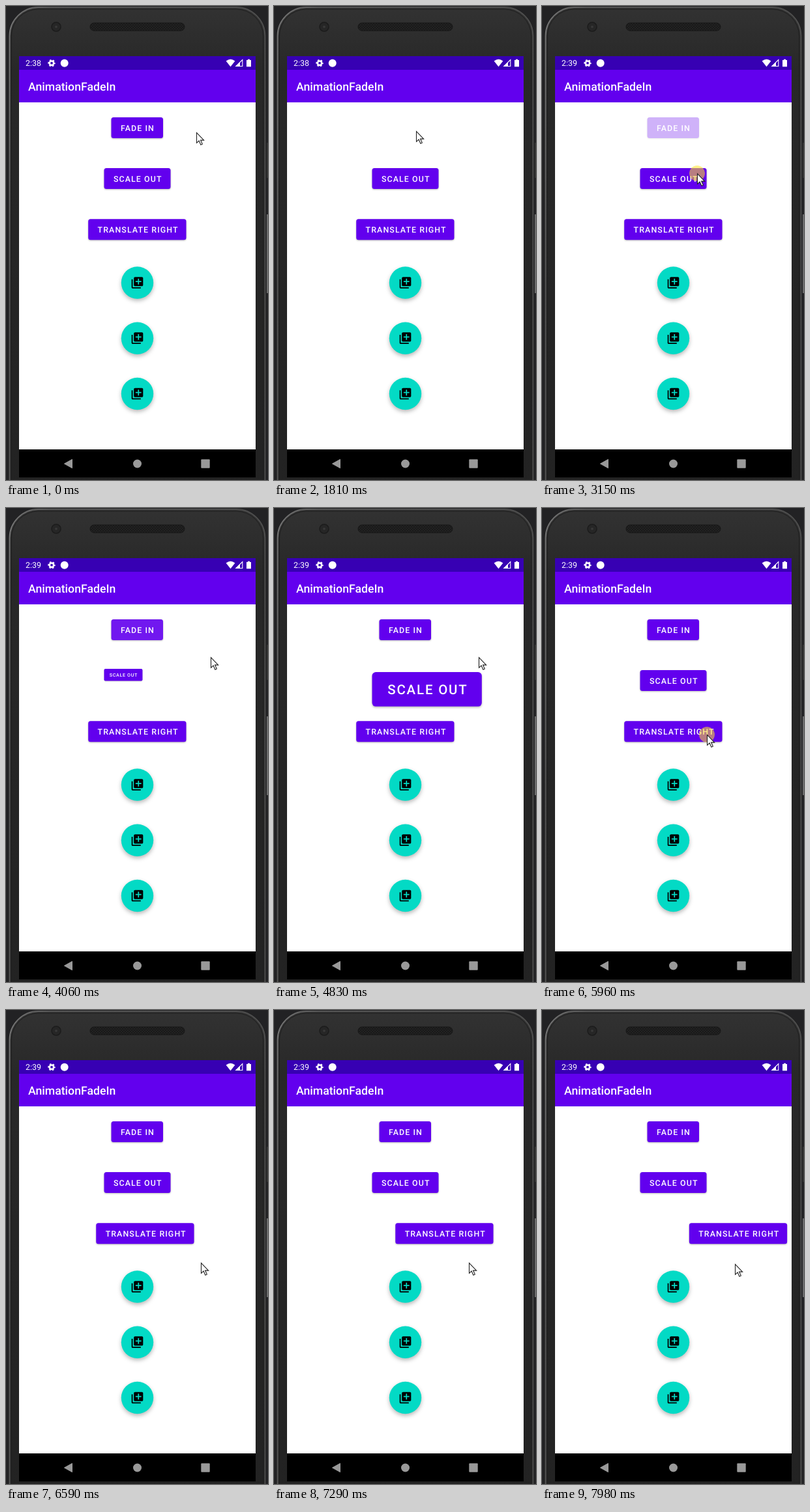
Write an HTML page that moves like this. It is 402 px wide and 728 px high and loops after 8 s.

```html
<!DOCTYPE html>
<html lang="en">
<head>
<meta charset="utf-8">
<title>Button animations</title>
<style>
  html, body { margin: 0; width: 100%; height: 100%; overflow: hidden; background: #222224; }
  svg { display: block; width: 402px; height: 728px; }
  text { font-family: Roboto, Arial, sans-serif; fill: #fff; text-rendering: geometricPrecision; }
  .label { font-size: 12.4px; font-weight: 500; letter-spacing: 1.1px; }
  .button rect { fill: #6200ee; filter: drop-shadow(0 1px 1px rgba(0, 0, 0, .28)); }
  .fab circle { fill: #03dac5; filter: drop-shadow(0 3px 3px rgba(0, 0, 0, .28)); }
</style>
</head>
<body>
<svg viewBox="0 0 402 728">
  <defs>
    <linearGradient id="shell" x2="0" y2="1">
      <stop offset="0" stop-color="#323232"/>
      <stop offset=".12" stop-color="#282828"/>
      <stop offset="1" stop-color="#222"/>
    </linearGradient>
    <linearGradient id="rim" x2="1" y2=".3">
      <stop offset="0" stop-color="#777"/>
      <stop offset=".15" stop-color="#555"/>
      <stop offset="1" stop-color="#4c4c4c"/>
    </linearGradient>
    <pattern id="mesh" width="4" height="4" patternUnits="userSpaceOnUse">
      <rect width="4" height="4" fill="#191919"/>
      <circle cx="1" cy="1" r=".8" fill="#2c2c2c"/>
      <circle cx="3" cy="3" r=".8" fill="#2c2c2c"/>
    </pattern>
    <path id="add" d="M4 6H2v14c0 1.1.9 2 2 2h14v-2H4V6zm16-4H8c-1.1 0-2 .9-2 2v12c0 1.1.9 2 2 2h12c1.1 0 2-.9 2-2V4c0-1.1-.9-2-2-2zm-1 9h-4v4h-2v-4H9V9h4V5h2v4h4v2z"/>
  </defs>

  <!-- phone -->
  <rect width="402" height="728" fill="#222224"/>
  <rect x="400" y="210" width="2" height="54" fill="#333"/>
  <rect x="400" y="320" width="2" height="121" fill="#6c6c6c"/>
  <rect x="4" y="1" width="395" height="800" rx="45" fill="#181818"/>
  <rect x="5.5" y="2" width="392" height="800" rx="44" fill="url(#shell)" stroke="url(#rim)" stroke-width="2"/>
  <rect x="8.5" y="5" width="386" height="800" rx="41" fill="none" stroke="#1f1f1f"/>
  <circle cx="77" cy="32" r="7" fill="#262626" stroke="#1c1c1c" stroke-width="1.5"/>
  <circle cx="77" cy="32" r="1.8" fill="#3a3a3a"/>
  <rect x="129" y="26" width="145" height="12" rx="6" fill="url(#mesh)" stroke="#171717"/>

  <!-- screen -->
  <rect x="20" y="77" width="363" height="647" fill="#fff"/>
  <rect x="20" y="77" width="363" height="21" fill="#3700b3"/>
  <rect x="20" y="98" width="363" height="50" fill="#6200ee"/>
  <rect x="20" y="681" width="363" height="43" fill="#000"/>
  <text id="clock" x="30" y="92.2" font-size="12.4"></text>
  <text x="34.1" y="129.6" font-size="17.66" font-weight="500">AnimationFadeIn</text>

  <g fill="#fff" transform="translate(0 -.3)">
    <circle cx="70" cy="88" r="3.2" fill="none" stroke="#fff" stroke-width="2.6"/>
    <circle cx="70" cy="88" r="4.9" fill="none" stroke="#fff" stroke-width="1.6" stroke-dasharray="2.6 2.53" stroke-dashoffset="1.3"/>
    <circle cx="89.7" cy="88" r="6"/>
    <path d="M344.5 93.5L337.6 84.7Q344.5 79.4 351.4 84.7Z"/>
    <path d="M352.8 92.8H362.8V82.8Z" fill="none" stroke="#fff" stroke-width="1.1"/>
    <path d="M352.2 93.3H359V86.6Z"/>
    <path d="M369 83.2h2v-1.2h3v1.2h2v10.3h-7z"/>
  </g>

  <g fill="#999">
    <path d="M89.5 703L101.5 696.3V709.7Z" stroke="#999" stroke-linejoin="round"/>
    <circle cx="201.5" cy="703" r="6.5"/>
    <rect x="299.3" y="696.3" width="13.4" height="13.4" rx="1"/>
  </g>

  <g id="content"></g>

  <g id="cursor">
    <circle id="press" r="12" fill="#ffe628" fill-opacity=".55"/>
    <path d="M.5.5V16.3L4.1 13L6.9 19.2L9.3 18.1L6.6 12.1H11.6Z" fill="#fff" stroke="#222" stroke-width="1.1"/>
  </g>
</svg>
<script>
  const LOOP = 8000, STEP = 70, EASE_MS = 2115;
  const $ = id => document.getElementById(id);
  const svgNS = "http://www.w3.org/2000/svg";

  function group(className, markup) {
    const g = document.createElementNS(svgNS, "g");
    g.setAttribute("class", className);
    g.innerHTML = markup;
    $("content").append(g);
    return g;
  }

  const button = (x, y, width, label) => group("button",
    `<rect x="${x}" y="${y}" width="${width}" height="32" rx="3.5"/>
     <text class="label" x="${x + 14.4}" y="${y + 20.6}">${label}</text>`);

  const fade = button(161.5, 171, 79.5, "FADE IN");
  const scale = button(150.5, 249, 102, "SCALE OUT");
  const slide = button(126.2, 327.2, 150.3, "TRANSLATE RIGHT");

  for (const y of [425, 510.2, 595.5]) {
    group("fab", `<circle cx="201.5" cy="${y}" r="24.7"/>
      <use href="#add" transform="translate(190.9 ${y - 10.6}) scale(.883)"/>`);
  }

  // time, x, y of the pointer tip
  const path = [
    [0, 292, 194], [500, 292, 194], [570, 290, 194], [770, 290, 194],
    [1020, 256, 203], [1260, 218, 192], [2290, 218, 192], [2500, 238, 232],
    [2780, 238, 232], [2990, 238, 257], [3400, 238, 257], [3800, 314, 229],
    [5180, 314, 229], [5600, 310, 298], [5660, 310, 298], [5870, 253, 348],
    [6300, 253, 348], [6440, 262, 357], [6580, 299, 388], [7350, 299, 388],
    [7700, 296, 390], [LOOP, 296, 390]
  ];
  const presses = [[1530, 1800], [3140, 3290], [5860, 6090]];

  const within = (t, from, to) => t >= from && t < to;
  const ease = (t, start) => {
    const p = Math.min(1, Math.max(0, (t - start) / EASE_MS));
    return (1 - Math.cos(Math.PI * p)) / 2;
  };

  function pointerAt(t) {
    const i = Math.max(1, path.findIndex(p => p[0] >= t));
    const [t0, x0, y0] = path[i - 1], [t1, x1, y1] = path[i];
    const p = Math.max(0, (t - t0) / (t1 - t0));
    return [x0 + (x1 - x0) * p, y0 + (y1 - y0) * p];
  }

  function draw(now) {
    const t = Math.floor((now % LOOP + 10) / STEP) * STEP;

    $("clock").textContent = t < 2010 ? "2:38" : "2:39";
    fade.setAttribute("opacity", t < 1800 ? 1 : ease(t, 2370));

    const size = within(t, 3296, 3296 + EASE_MS) ? 2 * ease(t, 3296) : 1;
    scale.setAttribute("transform",
      `translate(150.5 244.3) scale(${size}) translate(-150.5 -244.3)`);
    slide.setAttribute("transform", `translate(${103 * ease(t, 6110)} 0)`);

    $("cursor").setAttribute("transform", `translate(${pointerAt(t)})`);
    $("press").setAttribute("visibility",
      presses.some(p => within(t, ...p)) ? "visible" : "hidden");
  }

  const begin = performance.now();
  function tick() {
    draw(performance.now() - begin);
    requestAnimationFrame(tick);
  }
  tick();
</script>
</body>
</html>
```
